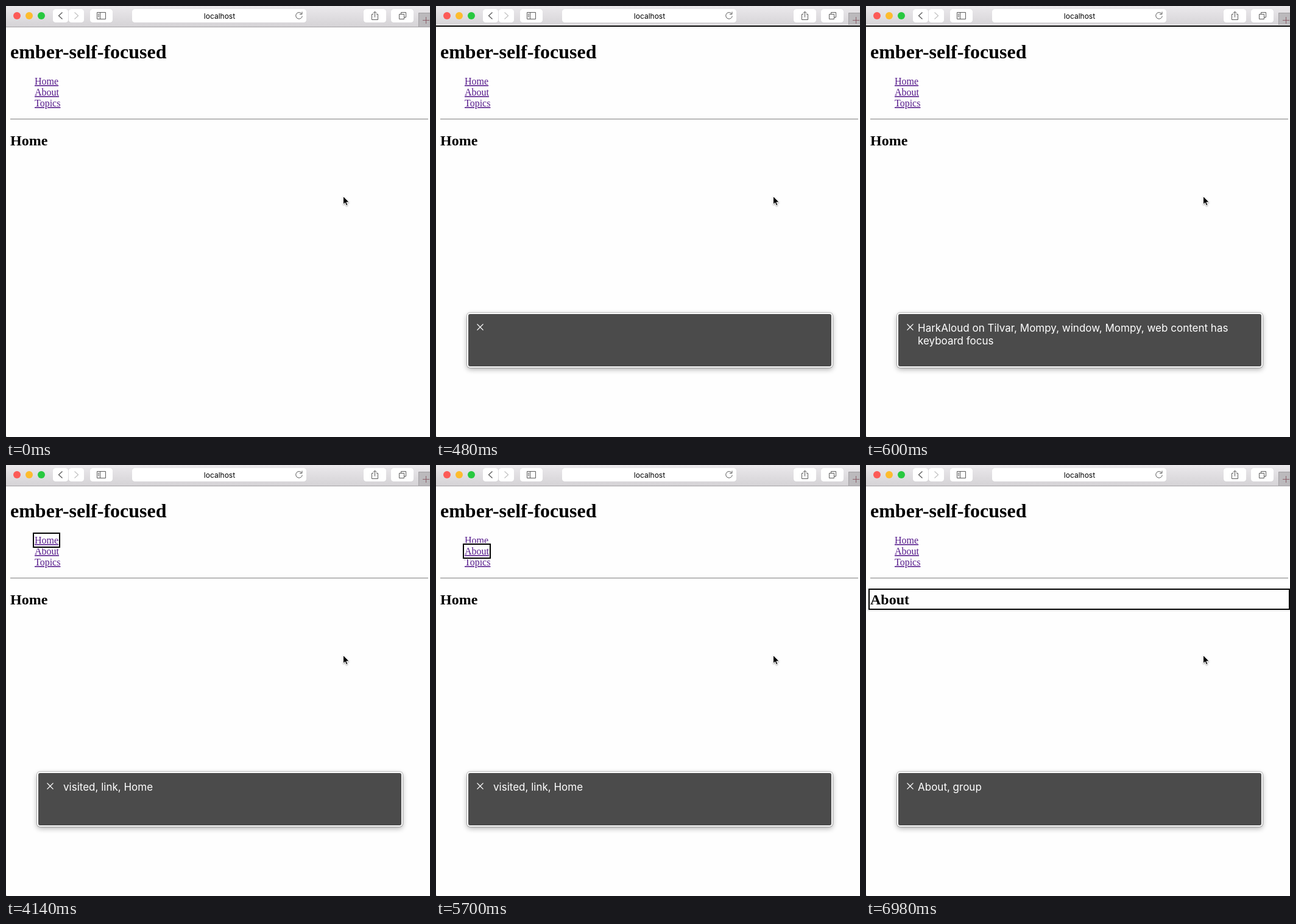
Animation of 696 by 708 pixels, one loop 8000 ms. Source, as an HTML page:

```html
<!DOCTYPE html>
<html lang="en">
<head>
<meta charset="utf-8">
<title>ember-self-focused</title>
<style>
  html, body { margin: 0; width: 100%; height: 100%; overflow: hidden; background: #fefefe; }
  #stage { position: relative; width: 696px; height: 708px; overflow: hidden; background: #fefefe; }
  svg { position: absolute; left: 0; top: 0; }
  .page { font-family: "Liberation Serif", "Times New Roman", serif; }
  .ui { font-family: Inter, "Open Sans", sans-serif; }
  h1, h2 { font-weight: bold; }
  .link { font-size: 16px; fill: #551a8b; text-decoration: underline; }
  .title { font-weight: bold; }
  .button { fill: #fff; filter: drop-shadow(0 .5px .4px rgba(0, 0, 0, .28)); }
  .icon { fill: none; stroke: #5c5c5c; stroke-width: 1; }

  .ring {
    position: absolute; box-sizing: border-box; border: 2px solid #000;
    box-shadow: 0 0 0 1px #fefefe, inset 0 0 0 1px #fefefe;
  }
  #ring-page { left: -4px; top: 32px; width: 704px; height: 690px; }
  #ring-home { left: 44px; top: 111px; width: 45px; height: 25px; }
  #ring-about { left: 44px; top: 129px; width: 46px; height: 25px; }
  #ring-heading {
    left: 4px; top: 203px; width: 692px; height: 35px;
    box-shadow: 0 0 0 1px #fefefe, 0 1px 0 1px #dedede, -1px 0 0 1px #dceaf5;
  }

  #panel {
    position: absolute; left: 51px; top: 504px; width: 600px; height: 90px;
    box-sizing: border-box; border: 2px solid #fff; border-radius: 5px; background: #4b4b4b;
    box-shadow: 0 0 1px 1px rgba(0, 0, 0, .22), 0 3px 8px rgba(0, 0, 0, .33);
  }
  #panel svg { left: -53px; top: -506px; }
  .speech { fill: #fff; font-size: 17px; }

  /* Every change is a hard cut on one 8 s clock. */
  .timed { opacity: 0; animation: 8s step-end infinite; }
  .stays { opacity: 1; }
  #panel { animation-name: open-panel; }
  #ring-page { animation-name: focus-page; }
  #say-page { animation-name: speak-page; }
  #ring-home { animation-name: focus-home; }
  #say-home { animation-name: speak-home; }
  #ring-about { animation-name: focus-about; }
  #say-about { animation-name: speak-about; }
  #title-home { animation-name: leave-home; }
  #title-about, #ring-heading { animation-name: enter-about; }
  #say-group { animation-name: speak-group; }

  @keyframes open-panel { 0% { opacity: 0 } 1.125% { opacity: 1 } }
  @keyframes focus-page { 6% { opacity: 1 } 50.625% { opacity: 0 } }
  @keyframes speak-page { 7.5% { opacity: 1 } 51.75% { opacity: 0 } }
  @keyframes focus-home { 50.625% { opacity: 1 } 71.25% { opacity: 0 } }
  @keyframes speak-home { 51.75% { opacity: 1 } 72.375% { opacity: 0 } }
  @keyframes focus-about { 71.25% { opacity: 1 } 86.125% { opacity: 0 } }
  @keyframes speak-about { 72.375% { opacity: 1 } 87.25% { opacity: 0 } }
  @keyframes leave-home { 0% { opacity: 1 } 86.125%, 100% { opacity: 0 } }
  @keyframes enter-about { 0% { opacity: 0 } 86.125% { opacity: 1 } }
  @keyframes speak-group { 0% { opacity: 0 } 87.25% { opacity: 1 } }
</style>
</head>
<body>
<div id="stage">
  <svg width="696" height="708" viewBox="0 0 696 708">
    <defs>
      <linearGradient id="bar" x2="0" y2="1">
        <stop offset="0" stop-color="#ebe9ec"/>
        <stop offset="1" stop-color="#d5d3d6"/>
      </linearGradient>
    </defs>

    <!-- toolbar -->
    <rect width="696" height="34" fill="url(#bar)"/>
    <rect y="34" width="696" height="1" fill="#a5a3a6"/>
    <circle cx="18" cy="16" r="6" fill="#fc5b57"/>
    <circle cx="38" cy="16" r="6" fill="#fdbc2e"/>
    <circle cx="58" cy="16" r="6" fill="#28c940"/>
    <g class="button">
      <rect x="77" y="5" width="25" height="22" rx="4"/>
      <rect x="103" y="5" width="25" height="22" rx="4"/>
      <rect x="138" y="5" width="37" height="22" rx="4"/>
      <rect x="207" y="5" width="286" height="22" rx="4"/>
      <rect x="587" y="5" width="37" height="22" rx="4"/>
      <rect x="632" y="5" width="37" height="22" rx="4"/>
    </g>
    <g class="icon">
      <path d="M92.5 10.5l-6 5.5 6 5.5" stroke-width="1.3"/>
      <path d="M112.500 10.5l6 5.500-6 5.500" stroke="#c4c4c4" stroke-width="1.3"/>
      <path d="M149.500 10.500h14v11h-14zM154.500 10.500v11M151 13.500h2M151 15.500h2M151 17.500h2"/>
      <path d="M603 13.500h-2.500v9h10v-9h-2.500M605.500 18.500v-9M602.500 12l3-3 3 3"/>
      <path d="M645.500 13.500h8v8h-8zM648.500 13.500v-3h8v8h-3"/>
      <path d="M485.500 13A5.300 5.300 0 1 0 486.300 16.500M486 9.500v4h-4"/>
    </g>
    <text class="ui" x="350.500" y="21" font-size="12" text-anchor="middle">localhost</text>
    <rect x="677" y="11" width="19" height="23" fill="#bbb9bc"/>
    <path d="M677.500 34V11.500H696" fill="none" stroke="#a09ea1"/>
    <path d="M684 23.500h11M689.500 18v11" stroke="#8c606b"/>

    <!-- page -->
    <g class="page">
      <text class="title" x="7" y="86" font-size="32">ember-self-focused</text>
      <text class="link" x="47" y="129">Home</text>
      <text class="link" x="47" y="147">About</text>
      <text class="link" x="47" y="165">Topics</text>
      <rect x="7" y="185" width="686" height="1" fill="#999"/>
      <rect x="7" y="186" width="686" height="1" fill="#dcdcdc"/>
      <text id="title-home" class="title timed" x="7" y="229" font-size="24">Home</text>
      <text id="title-about" class="title timed stays" x="7" y="229" font-size="24">About</text>
    </g>
    <rect y="707" width="1" height="1" fill="#999"/>
  </svg>

  <div id="ring-page" class="ring timed"></div>
  <div id="ring-home" class="ring timed"></div>
  <div id="ring-about" class="ring timed"></div>
  <div id="ring-heading" class="ring timed stays"></div>

  <div id="panel" class="timed stays">
    <svg class="ui" width="696" height="708" viewBox="0 0 696 708">
      <path d="M67.500 522.500l10 10M77.500 522.500l-10 10" stroke="#fff" stroke-width="1.1"/>
      <g class="speech">
        <text id="say-page" class="timed" y="535">
          <tspan x="85">HarkAloud on Tilvar, Mompy, window, Mompy, web content has</tspan>
          <tspan x="85" dy="21">keyboard focus</tspan>
        </text>
        <text id="say-home" class="timed" x="94" y="535">visited, link, Home</text>
        <text id="say-about" class="timed" x="94" y="535">visited, link, About</text>
        <text id="say-group" class="timed stays" x="85" y="535">About, group</text>
      </g>
    </svg>
  </div>

  <!-- pointer -->
  <svg width="696" height="708" viewBox="0 0 696 708">
    <path d="M553.500 312.500v13.500l3.100-2.900 2.100 4.900 2.300-1-2.100-4.700h4.300z"
      stroke="#fff" stroke-width="1" style="filter: drop-shadow(0 1px 1px rgba(0, 0, 0, .35))"/>
  </svg>
</div>
</body>
</html>
```
